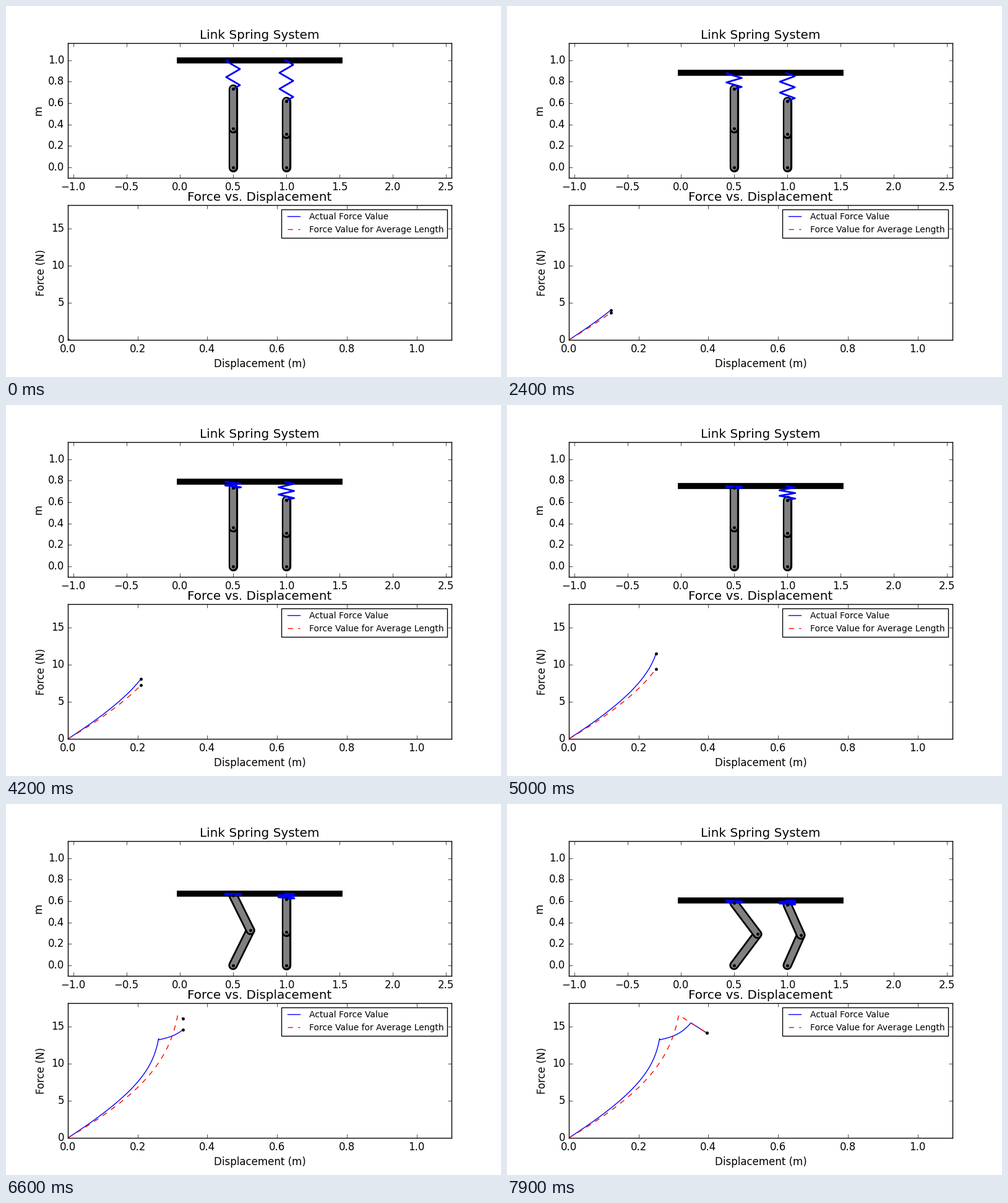
A matplotlib script for the animation above (8 s loop, 800 by 600 pixels).

```python
import numpy as np
import matplotlib.pyplot as plt
from matplotlib.animation import FuncAnimation

plt.style.use("classic")
plt.rcParams["font.family"] = "DejaVu Sans"

FRAMES, INTERVAL, STEP = 80, 100, 0.005
SEG = 0.15  # length of one spring segment


def soften(d, k, limit, p):
    return k * d * (1 - d / limit) ** -p


def buckled(d):
    return 16.53 - 30 * (d - 0.315)


def average_force(d):
    rise = soften(np.minimum(d, 0.315), 27.6, 0.335, 0.228)
    return np.where(d <= 0.3151, rise, buckled(d))


def actual_force(d):
    rise = soften(np.minimum(d, 0.26), 30.3, 0.27, 0.16)
    t = np.clip((d - 0.261) / 0.089, 0, 1)
    middle = 13.2 + 0.95 * t + 1.33 * t ** 3
    return np.where(d <= 0.2601, rise, np.where(d <= 0.3501, middle, buckled(d)))


def zigzag(x, bottom, top, free):
    """Rigid segments folding flat between bottom and top."""
    n = free / (SEG / 2)
    rise = (top - bottom) / n
    half = np.sqrt(SEG ** 2 - rise ** 2) / 2
    u = np.append(np.r_[0, np.arange(0.5, n)], n)
    phase = (u + 0.5) % 2
    return x + half * (1 - 2 * np.abs(phase - 1)), bottom + u * rise


class Leg:
    def __init__(self, ax, x, link, crit, gap, growth):
        self.x, self.link, self.crit = x, link, crit
        self.gap, self.growth = gap, growth
        self.free = 1 - 2 * link
        self.links = [
            [ax.plot([], [], color=c, lw=w, solid_capstyle="round")[0]
             for c, w in (("k", 11), ("gray", 7))]
            for _ in range(2)
        ]

    def add_spring(self, ax):
        self.spring, = ax.plot([], [], "b", lw=2)
        self.joints, = ax.plot([], [], "k.")

    def update(self, d):
        tip = 2 * self.link
        if d > self.crit:
            tip = 1 - d - self.gap - self.growth * (d - self.crit)
        knee = np.sqrt(max(self.link ** 2 - (tip / 2) ** 2, 0))
        xs = [self.x, self.x + knee, self.x]
        ys = [0, tip / 2, tip]
        for i, pair in enumerate(self.links):
            for line in pair:
                line.set_data(xs[i:i + 2], ys[i:i + 2])
        self.spring.set_data(*zigzag(self.x, tip, 1 - d, self.free))
        self.joints.set_data(xs, ys)


fig, (top, low) = plt.subplots(2, 1, figsize=(8, 6), dpi=100, facecolor="w")

top.set(xlim=(-1.05, 2.55), ylim=(-0.1, 1.16),
        title="Link Spring System", ylabel="m")
top.set_xticks(np.arange(-1, 2.6, 0.5))
top.set_yticks(np.arange(0, 1.1, 0.2))
legs = [Leg(top, 0.5, 0.365, 0.26, 0.01, 0.093),
        Leg(top, 1.0, 0.31, 0.35, 0.03, 0.2)]
bar, = top.plot([], [], "k", lw=7)
for leg in legs:
    leg.add_spring(top)

low.set(xlim=(0, 1.1), ylim=(0, 18.15), title="Force vs. Displacement",
        xlabel="Displacement (m)", ylabel="Force (N)")
low.set_xticks(np.arange(0, 1.1, 0.2))
low.set_yticks([0, 5, 10, 15])
actual, = low.plot([], [], "b", label="Actual Force Value")
average, = low.plot([], [], "r--", label="Force Value for Average Length")
dots, = low.plot([], [], "k.")
low.legend(loc="upper right", fontsize=10)


def draw(i):
    d = i * STEP
    bar.set_data([0, 1.5], [1 - d, 1 - d])
    for leg in legs:
        leg.update(d)
    ds = np.arange(5 * i + 1) * STEP / 5
    fa, fb = actual_force(ds), average_force(ds)
    actual.set_data(ds, fa)
    average.set_data(ds, fb)
    dots.set_data([d, d], [fa[-1], fb[-1]])
    return []


anim = FuncAnimation(fig, draw, frames=FRAMES, interval=INTERVAL,
                     init_func=lambda: draw(0), repeat=True, repeat_delay=0)
plt.show()
```
